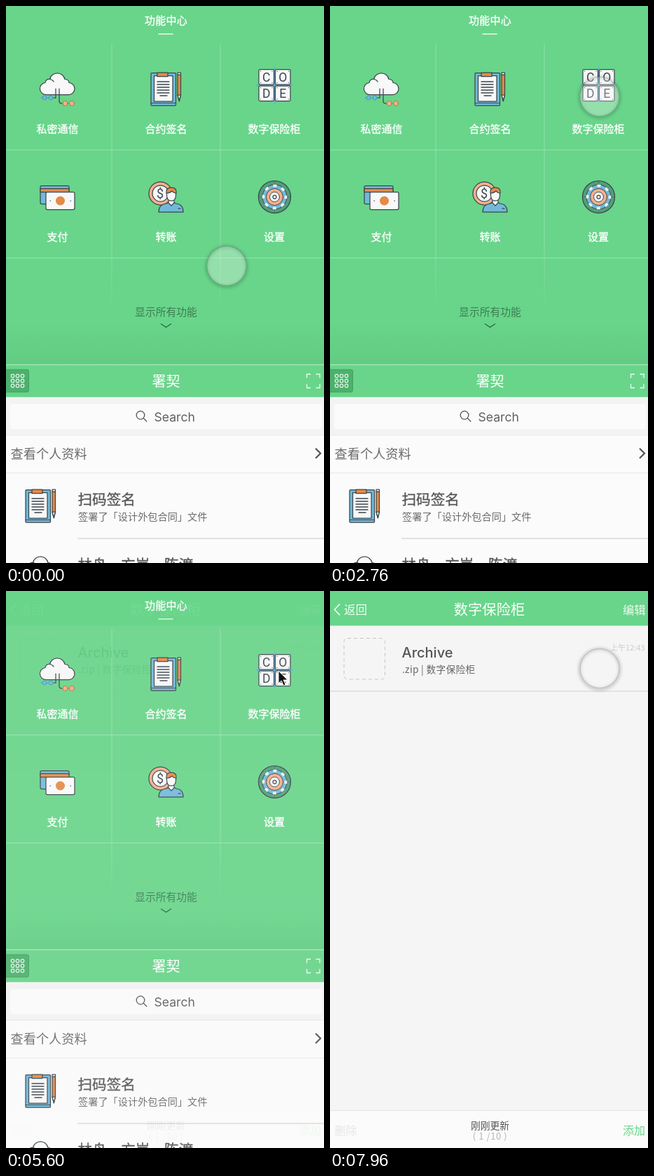
Animation of 454 by 795 pixels, one loop 8 s. Source, as an HTML page:

```html
<!DOCTYPE html>
<html lang="zh-CN">
<head>
<meta charset="utf-8">
<title>功能中心</title>
<style>
  html, body { margin: 0; width: 100%; height: 100%; overflow: hidden; background: #f5f5f5; }
  svg { display: block; width: 100%; height: 100%; }
  text { font-family: "Noto Sans CJK SC", "Noto Sans CJK", "Noto Sans", sans-serif; }
  .latin { font-family: Inter, "Noto Sans CJK SC", sans-serif; }
  .mid { text-anchor: middle; }
  .end { text-anchor: end; }
  .light { font-weight: 300; }
  .label { font-size: 15px; fill: #fff; stroke: #fff; stroke-width: .35; text-anchor: middle; }
  .name { font-size: 20.6px; fill: #555; stroke: #555; stroke-width: .3; }
  .icon { stroke: #3a464d; stroke-width: 1.25; stroke-linejoin: round; stroke-linecap: round; fill: none; }
  .icon text { stroke: none; fill: #3a464d; text-anchor: middle; font-family: Roboto, sans-serif; }
  .white { fill: #f8f8f8; }
  .blue { fill: #72b9d9; }
  .orange { fill: #e58a48; }
  .peach { fill: #f4b08a; }
  .line { fill: none; stroke: #fff; }
</style>
</head>
<body>
<svg viewBox="0 0 454 795" preserveAspectRatio="none">
  <defs>
    <linearGradient id="panel" x1="0" y1="0" x2="0" y2="1">
      <stop offset="0" stop-color="#68d58a"/>
      <stop offset=".88" stop-color="#68d58a"/>
      <stop offset="1" stop-color="#62cc83"/>
    </linearGradient>
    <linearGradient id="fade" gradientUnits="userSpaceOnUse" x1="0" y1="54" x2="0" y2="440">
      <stop offset="0" stop-color="#fff" stop-opacity=".26"/>
      <stop offset=".75" stop-color="#fff" stop-opacity=".26"/>
      <stop offset="1" stop-color="#fff" stop-opacity="0"/>
    </linearGradient>
    <filter id="soft" x="-30%" y="-30%" width="160%" height="160%">
      <feGaussianBlur stdDeviation="2"/>
    </filter>

    <g id="cloud" class="icon">
      <path class="white" d="M58 126.500A8.500 8.500 0 0 1 56 109.500Q57 104 62.500 104.500A11 11 0 0 1 84 104.500Q90 105 90 109.500A8.500 8.500 0 0 1 89 126.500z"/>
      <path d="M62.500 104.500q4 .5 5.500 3.500"/>
      <path d="M71 118v13h-3M76 118v18q0 3 4 3"/>
      <g stroke="#4795c6" stroke-width="1">
        <path d="M50 131h19"/>
        <circle class="blue" cx="55" cy="131" r="3"/><circle class="blue" cx="64" cy="131" r="3"/>
      </g>
      <g stroke="#b8773f" stroke-width="1">
        <path d="M80 139h18"/>
        <circle class="peach" cx="84.500" cy="139" r="3.500"/><circle class="peach" cx="94" cy="139" r="3.500"/>
      </g>
    </g>

    <g id="contract" class="icon">
      <rect class="blue" x="207" y="95.500" width="35.500" height="46.500" rx="1"/>
      <path class="white" d="M211.500 99.500h26.500v36.500h-26.500z"/>
      <path d="M207 138.500h35.500" stroke-width="1"/>
      <path class="orange" d="M216 95h15v5.500h-15z"/>
      <path d="M216 108h17M216 112h17M216 116h17M216 120h17M216 124h17M220 128h10" stroke-width="1.300"/>
      <path class="orange" d="M245 98h4.500v29l-2.200 9-2.300-9z"/>
      <path class="white" d="M245 98v-3h4.500v3zM245 127h4.500l-2.200 8z"/>
    </g>
  </defs>

  <g id="home">
    <rect width="454" height="795" fill="#fbfbfb"/>
    <rect width="454" height="512" fill="url(#panel)"/>
    <rect x="150.500" y="54" width="1" height="386" fill="url(#fade)"/>
    <rect x="305.500" y="54" width="1" height="386" fill="url(#fade)"/>
    <path class="line" d="M0 205.500h454M0 359.500h454" stroke-opacity=".3"/>
    <text class="label" x="228.500" y="25.500" letter-spacing=".3">功能中心</text>
    <path class="line" d="M217.500 40h21" stroke-width="1.300"/>

    <use href="#cloud"/>
    <use href="#contract"/>

    <g class="icon">
      <path d="M383.500 88v50M358 113h51" stroke="#68acd0" stroke-width="2"/>
      <g class="white">
        <rect x="361" y="90.500" width="21.500" height="21.500" rx="1.500"/>
        <rect x="384.500" y="90.500" width="21.500" height="21.500" rx="1.500"/>
        <rect x="361" y="114" width="21.500" height="21.500" rx="1.500"/>
        <rect x="384.500" y="114" width="21.500" height="21.500" rx="1.500"/>
      </g>
      <g font-size="17.500">
        <text x="371.700" y="107.500">C</text><text x="395.300" y="107.500">O</text>
        <text x="371.700" y="131">D</text><text x="395.300" y="131">E</text>
      </g>
      <path d="M363.500 93h.1M380 93h.1M363.500 109.500h.1M380 109.500h.1M387 93h.1M403.500 93h.1M387 109.500h.1M403.500 109.500h.1M363.500 116.500h.1M380 116.500h.1M363.500 133h.1M380 133h.1M387 116.500h.1M403.500 116.500h.1M387 133h.1M403.500 133h.1"/>
    </g>

    <g class="icon">
      <rect class="blue" x="49" y="256.500" width="41" height="26" rx="2"/>
      <path class="orange" d="M49 260.500h41v5h-41z"/>
      <rect class="white" x="57" y="265.500" width="41" height="25" rx="2"/>
      <circle class="orange" cx="77.500" cy="278" r="6.500" stroke="none"/>
      <path d="M63 278h.5M92 278h.5"/>
    </g>

    <g class="icon">
      <circle class="peach" cx="220.500" cy="267.500" r="16.500"/>
      <circle class="white" cx="220.500" cy="267.500" r="11.500"/>
      <text x="220" y="274" font-size="18">$</text>
      <path class="blue" d="M218 294q0-11 11-12l4-2h6l4 2q10 1 10 12z"/>
      <path class="white" d="M232 276v5l4 4 4-4v-5z"/>
      <path class="white" d="M229.500 266q0-6 6.500-6t6.500 6v4q0 8-6.500 8t-6.500-8z"/>
      <path class="orange" d="M229 267q-1-8 7-8t7 8q-4 0-6-3-3 3-8 3z"/>
      <path d="M246 289h3"/>
    </g>

    <g class="icon">
      <circle cx="383.500" cy="272.500" r="23" fill="#539f78"/>
      <circle class="blue" cx="383.500" cy="272.500" r="17.500" stroke-width="1"/>
      <circle cx="383.500" cy="272.500" r="16" stroke="#eef3f5" stroke-width="3.500" stroke-linecap="butt" stroke-dasharray="5 7.566" stroke-dashoffset="2.500"/>
      <circle class="peach" cx="383.500" cy="272.500" r="12" stroke-width="1"/>
      <circle class="white" cx="383.500" cy="272.500" r="7" stroke-width="1"/>
      <circle cx="383.500" cy="272.500" r="2.500"/>
      <path d="M383.500 252v.1M383.500 293v.1M363 272.500h.1M404 272.500h.1"/>
    </g>

    <text class="label" x="73.500" y="180.500">私密通信</text>
    <text class="label" x="228.500" y="180.500">合约签名</text>
    <text class="label" x="383" y="180.500">数字保险柜</text>
    <text class="label" x="73.500" y="334.500">支付</text>
    <text class="label" x="228.500" y="334.500">转账</text>
    <text class="label" x="383" y="334.500">设置</text>

    <text class="mid light" x="228.500" y="441.500" font-size="14.800" fill="#3b7d52">显示所有功能</text>
    <path d="M221 453.500l7.500 5 7.500-5" fill="none" stroke="#27613c" stroke-width="1.200"/>

    <rect y="512" width="454" height="46.500" fill="#68d58a"/>
    <path class="line" d="M0 512h454" stroke-opacity=".6"/>
    <rect x="-3" y="519" width="35.500" height="32" rx="2.500" fill="#4cb16c" stroke="#419f60"/>
    <g id="dots" class="line" stroke-opacity=".85" stroke-width="1.200"></g>
    <text class="mid" x="228.500" y="542.500" font-size="20" fill="#fff">署契</text>
    <path class="line" d="M429.500 531v-5.500h5.500M442.500 525.500h5.500v5.500M448 539.500v5.500h-5.500M435 545h-5.500v-5.500" stroke-opacity=".9" stroke-width="1.300"/>

    <rect y="558.500" width="454" height="54" fill="#f3f3f3"/>
    <rect x="6" y="568" width="445" height="36" rx="4" fill="#fbfbfb"/>
    <g fill="none" stroke="#555" stroke-width="1.300">
      <circle cx="192" cy="584" r="5.800"/><path d="M196.200 588.200l5 5"/>
    </g>
    <text class="latin" x="211.500" y="592.500" font-size="17.600" fill="#606060">Search</text>
    <path d="M0 612.500h454M0 666.500h454" stroke="#e8e8e8"/>
    <text class="light" x="6.500" y="645.500" font-size="18.200" fill="#6a6a6a">查看个人资料</text>
    <path d="M442 631.500l7 7-7 7" fill="none" stroke="#555" stroke-width="2.200"/>
    <use href="#contract" x="-179" y="595"/>
    <text class="name" x="102.500" y="712">扫码签名</text>
    <text class="light" x="103" y="734" font-size="14.200" fill="#6c6c6c">签署了「设计外包合同」文件</text>
    <path d="M102 760h352" stroke="#e2e2e2" stroke-width="2"/>
    <use href="#cloud" x="-24" y="690"/>
    <text class="name" x="102.500" y="804.500">林舟、方岚、陈渡</text>
  </g>

  <g id="vault">
    <rect width="454" height="795" fill="#f5f5f5"/>
    <rect width="454" height="49.500" fill="#68d58a"/>
    <path class="line" d="M14 18.500l-7.500 8 7.500 8" stroke-width="1.500"/>
    <g fill="#fff">
      <text class="light" x="20" y="32.500" font-size="16.500" fill-opacity=".9">返回</text>
      <text class="mid" x="227.500" y="33.500" font-size="20.300">数字保险柜</text>
      <text class="light end" x="450.500" y="32.500" font-size="16.300" fill-opacity=".9">编辑</text>
    </g>
    <rect x="20" y="67.500" width="58.500" height="58.500" rx="5" fill="none" stroke="#c6c6c6" stroke-dasharray="5 4"/>
    <text class="latin" x="102.500" y="94.500" font-size="20" font-weight="500" fill="#555">Archive</text>
    <text x="103" y="116.500" font-size="13.700" letter-spacing=".3" fill="#666">.zip | 数字保险柜</text>
    <text class="light end" x="449.500" y="85" font-size="11" fill="#ccc">上午12:43</text>
    <path d="M0 143h454" stroke="#dedede" stroke-width="1.500"/>
    <rect y="742" width="454" height="53" fill="#fbfbfb"/>
    <path d="M0 741.500h454" stroke="#e6e6e6"/>
    <text x="6.500" y="775.500" font-size="16" fill="#e6e6e6">删除</text>
    <text class="mid" x="228.500" y="767.500" font-size="13.800" fill="#555">刚刚更新</text>
    <text class="mid light" x="228.500" y="782.500" font-size="13" letter-spacing=".6" fill="#b4b4b4">( 1 /10 )</text>
    <text class="end" x="450" y="775.500" font-size="16" fill="#68d58a">添加</text>
  </g>

  <g id="touch">
    <circle cy="1" r="28.500" fill="none" stroke="#000" stroke-opacity=".26" stroke-width="3" filter="url(#soft)"/>
    <circle r="28" fill="#f5f5f5" fill-opacity=".31" stroke="#777" stroke-opacity=".35"/>
  </g>
  <path id="pointer" d="M389 114v18l4.200-4 3 7 3-1.300-3-6.700h6z" fill="#111" stroke="#fff"/>
</svg>
<script>
  const LOOP = 8000;
  const FADE = [5540, 6310];
  const POINTER = [5500, 5740];
  // time, x, y of the touch spot
  const PATH = [[0, 315, 371], [760, 355, 315], [1920, 382, 192], [3000, 385, 117], [3720, 385, 110.5]];

  const byId = id => document.getElementById(id);
  const clamp = v => Math.min(1, Math.max(0, v));

  byId('dots').innerHTML = [9.5, 16.5, 23.5].flatMap(x =>
    [528, 535, 542].map(y => `<circle cx="${x}" cy="${y}" r="2.3"/>`)).join('');

  // Slope at a key; both ends of the path are at rest.
  function slope(i, axis) {
    if (i === 0 || i === PATH.length - 1) return 0;
    const a = PATH[i - 1], b = PATH[i + 1];
    return (b[axis] - a[axis]) / (b[0] - a[0]);
  }

  function along(t, axis) {
    const i = PATH.findIndex(key => key[0] > t) - 1;
    if (i < 0) return PATH[PATH.length - 1][axis];
    const a = PATH[i], b = PATH[i + 1], span = b[0] - a[0];
    const u = (t - a[0]) / span, v = 1 - u;
    return v * v * (1 + 2 * u) * a[axis] + u * u * (1 + 2 * v) * b[axis]
      + span * u * v * (v * slope(i, axis) - u * slope(i + 1, axis));
  }

  function draw(t) {
    const pointing = t >= POINTER[0] && t < POINTER[1];
    byId('touch').setAttribute('transform', `translate(${along(t, 1)} ${along(t, 2)})`);
    byId('touch').style.display = pointing ? 'none' : '';
    byId('pointer').style.display = pointing ? '' : 'none';
    byId('vault').style.opacity = clamp((t - FADE[0]) / (FADE[1] - FADE[0]));
  }

  const start = performance.now();
  function tick() {
    draw((performance.now() - start) % LOOP);
    requestAnimationFrame(tick);
  }
  tick();
</script>
</body>
</html>
```
